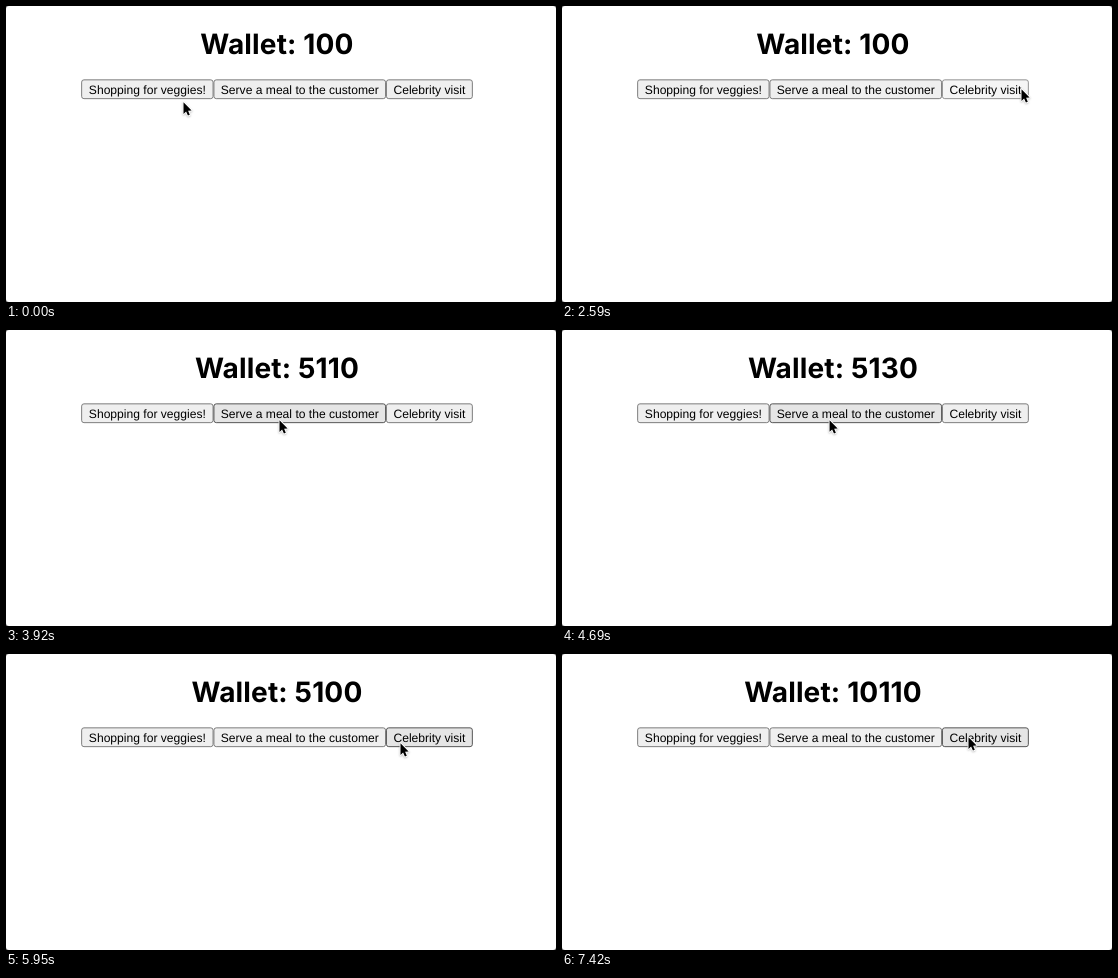
An HTML page with a canvas for the animation above (7.98 s loop, 550 by 296 pixels).

```html
<!DOCTYPE html>
<html lang="en">
<head>
<meta charset="utf-8">
<title>Wallet</title>
<style>
  html, body { margin: 0; width: 100%; height: 100%; overflow: hidden; background: #fff; }
  canvas { display: block; width: 550px; height: 296px; }
</style>
</head>
<body>
<canvas id="stage" width="550" height="296"></canvas>
<script>
const canvas = document.getElementById('stage');
const ctx = canvas.getContext('2d');
const LOOP = 7980, STEP = 70, CLICK_GAP = 245;
const TOP = 73.4, BOTTOM = 93.1;
const LABEL_FONT = '12.1px "Liberation Sans", Arial, sans-serif';
const HEADING_FONT = 'bold 28px Inter, sans-serif';

const snap = time => Math.floor(time / STEP) * STEP;
const easeInOut = p => p < 0.5 ? 4 * p ** 3 : 1 - 4 * (1 - p) ** 3;

const buttons = [
  { label: 'Shopping for veggies!', left: 75.2, right: 207.5, gain: -10, hold: 140 },
  { label: 'Serve a meal to the customer', left: 207.5, right: 380, gain: 10, hold: 70 },
  { label: 'Celebrity visit', left: 380, right: 466.8, gain: 5000, hold: 70 },
];

const looks = {
  normal: { fill: '#efefef', border: '#767676' },
  hover: { fill: '#e5e5e5', border: '#4f4f4f' },
  active: { fill: '#f5f5f5', border: '#8d8d8d' },
};

// Where the pointer rests, when it gets there, and when its first click is released
const stops = [
  { x: 177, y: 95, arrive: 0 },
  { x: 174, y: 91, arrive: 1190, travel: 210, click: 1540 },
  { x: 312.5, y: 78, arrive: 1820, click: 2030 },
  { x: 459, y: 82, arrive: 2240, travel: 210, click: 2660 },
  { x: 392, y: 87, arrive: 3080, travel: 420 },
  { x: 273, y: 89, arrive: 3570, travel: 210, click: 3850, count: 3 },
  { x: 178, y: 88, arrive: 4900, click: 5040, count: 3 },
  { x: 394, y: 88, arrive: 5950, travel: 420 },
  { x: 300, y: 87, arrive: 6440, click: 6720 },
  { x: 406, y: 82, arrive: 7210, travel: 490, sag: 27, click: 7420 },
];

const clicks = stops.filter(stop => stop.click).flatMap(stop => {
  const { gain, hold } = buttonUnder(stop);
  return Array.from({ length: stop.count ?? 1 }, (_, i) => {
    const up = snap(stop.click + i * CLICK_GAP);
    return { down: up - hold, up, gain };
  });
});

function buttonUnder({ x, y }) {
  if (y < TOP || y > BOTTOM) return undefined;
  return buttons.find(b => x >= b.left && x < b.right);
}

function pointerAt(time) {
  let { x, y } = stops[0];
  for (const { x: nextX, y: nextY, arrive, travel = 280, sag = 0 } of stops.slice(1)) {
    const p = Math.min(1, (time - arrive + travel) / travel);
    if (p <= 0) break;
    const e = easeInOut(p);
    x += (nextX - x) * e;
    y += (nextY - y) * e + sag * Math.sin(Math.PI * e);
  }
  return { x, y };
}

function walletAt(time) {
  return clicks
    .filter(({ up }) => up <= time)
    .reduce((sum, { gain }) => sum + gain, 100);
}

function drawText(text, x, y, font, spacing = 0) {
  ctx.font = font;
  ctx.letterSpacing = `${spacing}px`;
  ctx.textRendering = 'geometricPrecision';
  ctx.textAlign = 'center';
  ctx.fillStyle = '#000';
  ctx.fillText(text, x, y);
}

function drawButton({ label, left, right }, { fill, border }) {
  ctx.beginPath();
  ctx.roundRect(left + 0.45, TOP + 0.45, right - left - 0.9, BOTTOM - TOP - 0.9, 2.3);
  ctx.fillStyle = fill;
  ctx.fill();
  ctx.strokeStyle = border;
  ctx.lineWidth = 0.95;
  ctx.stroke();
  drawText(label, (left + right) / 2, 87.6, LABEL_FONT);
}

function drawPointer({ x, y }) {
  const outline = [[0, 0], [0, 11.7], [2.6, 9.3], [4.4, 13.4], [6.3, 12.6], [4.6, 8.6], [8.1, 8.3]];
  ctx.beginPath();
  outline.forEach(([dx, dy]) => ctx.lineTo(x + 0.5 + dx, y + 1.2 + dy));
  ctx.closePath();
  ctx.lineJoin = 'round';
  ctx.lineWidth = 1.8;
  ctx.strokeStyle = '#fff';
  ctx.save();
  ctx.shadowColor = 'rgba(0, 0, 0, 0.25)';
  ctx.shadowBlur = 2;
  ctx.shadowOffsetY = 0.8;
  ctx.stroke();
  ctx.restore();
  ctx.fillStyle = '#000';
  ctx.fill();
}

function drawWindow() {
  ctx.fillStyle = '#555';
  ctx.fillRect(0, 0, canvas.width, canvas.height);
  ctx.beginPath();
  ctx.roundRect(0, 0, canvas.width, canvas.height, 3);
  ctx.fillStyle = '#fff';
  ctx.fill();
}

function draw(elapsed) {
  const time = snap(elapsed % LOOP);
  const pointer = pointerAt(time);
  const hovered = buttonUnder(pointer);
  const pressed = clicks.some(({ down, up }) => time >= down && time < up);

  drawWindow();
  drawText(`Wallet: ${walletAt(time)}`, 271, 47.6, HEADING_FONT, 0.15);
  for (const button of buttons) {
    const state = button !== hovered ? 'normal' : pressed ? 'active' : 'hover';
    drawButton(button, looks[state]);
  }
  drawPointer(pointer);
}

const start = performance.now();
function tick() {
  draw(performance.now() - start);
  requestAnimationFrame(tick);
}
tick();
</script>
</body>
</html>
```
